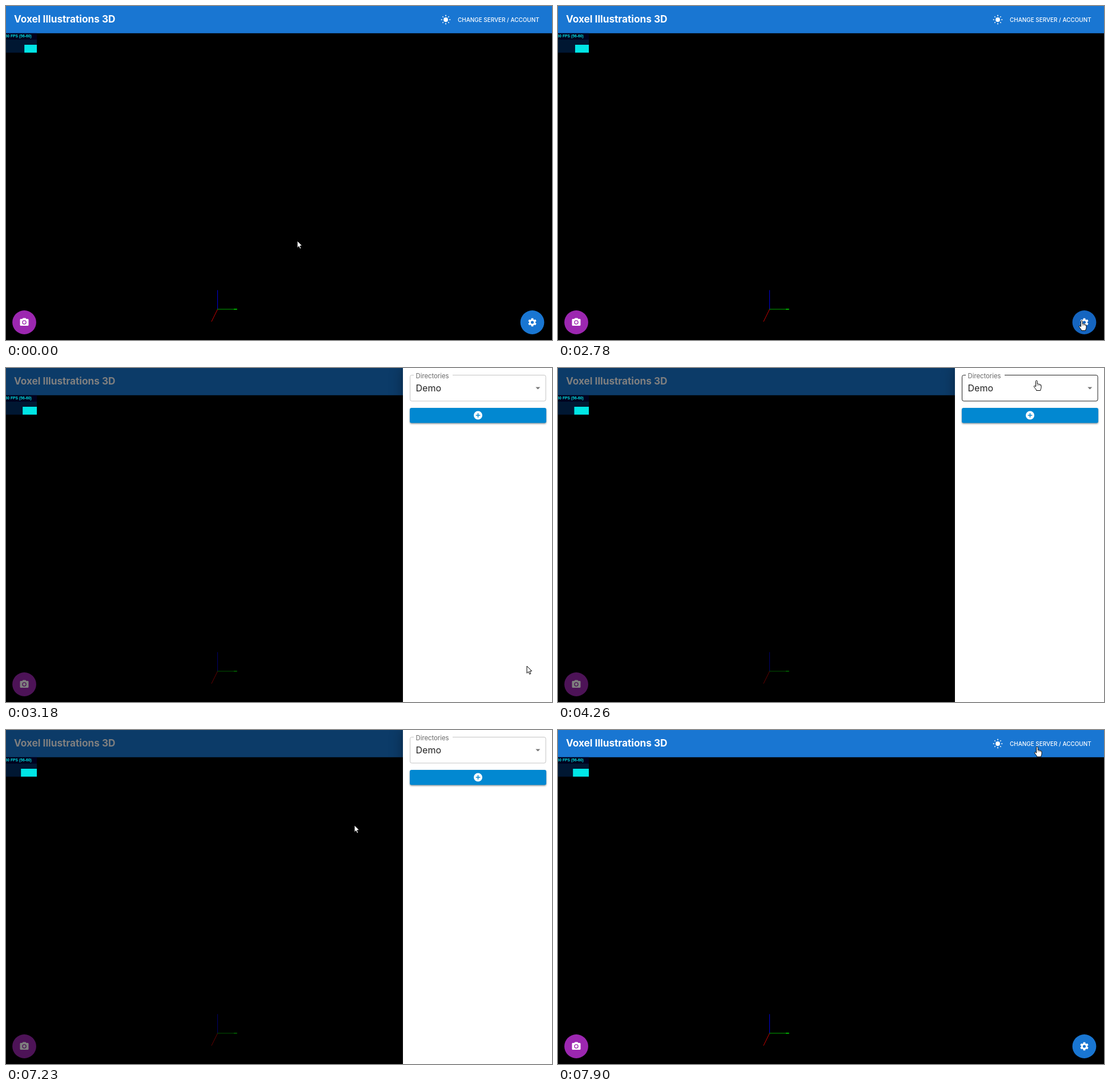
These frames come from a looping animation (956 px wide and 586 px high, 8 s). An HTML page with a canvas:

```html
<!DOCTYPE html>
<html lang="en">
<head>
<meta charset="utf-8">
<title>Voxel Illustrations 3D</title>
<style>
html, body { margin: 0; width: 100%; height: 100%; overflow: hidden; background: #000; }
canvas { display: block; width: 956px; height: 586px; }
</style>
</head>
<body>
<canvas id="stage" width="956" height="586"></canvas>
<script>
const ctx = document.getElementById('stage').getContext('2d');
const W = 956, H = 586, LOOP = 8000, DRAWER = 261, BAR = 47.8;
const BLUE = '#1976d2';
const FONT = 'Inter, "Open Sans", sans-serif';
const EVENT = { open: 2844, focus: 4340, menuOpen: 4340, menuClose: 5544, blur: 7150, close: 7290 };

// The screen refreshes at uneven intervals; delays in hundredths of a second.
const delays = [12, 15, 12, 12, 12, 15, 12, 12, 15, 12, 15, 12, 15, 12, 15, 15, 12, 12, 15, 27, 12,
  12, 15, 15, 12, 15, 12, 15, 27, 12, 15, 12, 15, 15, 40, 40, 15, 12, 15, 12, 40,
  12, 15, 12, 15, 12, 15, 12, 12, 15, 13, 10];

// Pointer waypoints: time, x, y.
const pointerPath = [
  [0, 510, 412], [540, 484, 430], [1020, 490, 445], [1440, 575, 449], [1830, 746, 465],
  [2130, 855, 497], [2370, 915, 548], [2520, 917, 552], [2910, 917, 552], [3180, 912, 523],
  [3600, 862, 170], [3870, 840, 24], [4140, 838, 22], [4410, 838, 22], [4830, 816, 85],
  [5630, 816, 85], [6170, 770, 152], [6570, 768, 153], [7100, 612, 166], [7230, 610, 167],
  [7500, 728, 112], [7770, 815, 50], [7900, 839, 29.5]
];

const clamp = v => Math.min(1, Math.max(0, v));

function bezier(x1, y1, x2, y2) {
  const at = (u, a, b) => 3 * (1 - u) * (1 - u) * u * a + 3 * (1 - u) * u * u * b + u * u * u;
  return value => {
    const x = clamp(value);
    if (x === 0 || x === 1) return x;
    let lo = 0, hi = 1;
    for (let i = 0; i < 24; i++) {
      const mid = (lo + hi) / 2;
      if (at(mid, x1, x2) < x) lo = mid; else hi = mid;
    }
    return at(lo, y1, y2);
  };
}
const easeOut = bezier(0, 0, 0.2, 1);
const easeInOut = bezier(0.4, 0, 0.2, 1);
const easeSharp = bezier(0.4, 0, 0.6, 1);

function refreshTime(t) {
  let time = 0;
  for (const d of delays) {
    if (time + d * 10 > t) break;
    time += d * 10;
  }
  return time;
}

function pointerAt(t) {
  const i = pointerPath.findIndex(p => p[0] > t);
  if (i < 0) return pointerPath[pointerPath.length - 1].slice(1);
  const a = pointerPath[i - 1], b = pointerPath[i];
  const k = (t - a[0]) / (b[0] - a[0]);
  return [a[1] + (b[1] - a[1]) * k, a[2] + (b[2] - a[2]) * k];
}

function rect(x, y, w, h, color) {
  ctx.fillStyle = color;
  ctx.fillRect(x, y, w, h);
}

function disc(x, y, r, color) {
  ctx.fillStyle = color;
  ctx.beginPath();
  ctx.arc(x, y, r, 0, Math.PI * 2);
  ctx.fill();
}

function roundBox(x, y, w, h, r, color) {
  ctx.fillStyle = color;
  ctx.beginPath();
  ctx.roundRect(x, y, w, h, r);
  ctx.fill();
}

function line(x1, y1, x2, y2, color, width = 1) {
  ctx.strokeStyle = color;
  ctx.lineWidth = width;
  ctx.beginPath();
  ctx.moveTo(x1, y1);
  ctx.lineTo(x2, y2);
  ctx.stroke();
}

function label(str, x, y, size, color, weight = 400, family = FONT) {
  ctx.font = `${weight} ${size}px ${family}`;
  ctx.fillStyle = color;
  ctx.fillText(str, x, y);
}

function shadow(color, blur, dx = 0, dy = 0) {
  ctx.shadowColor = color;
  ctx.shadowBlur = blur;
  ctx.shadowOffsetX = dx;
  ctx.shadowOffsetY = dy;
}

function layer(draw) {
  ctx.save();
  draw();
  ctx.restore();
}

function sunIcon(x, y) {
  disc(x, y, 3.9, '#fff');
  layer(() => {
    ctx.translate(x, y);
    ctx.lineCap = 'round';
    for (let i = 0; i < 8; i++) {
      line(0, -6.6, 0, i % 2 ? -7.4 : -7.7, '#fff', 1.5);
      ctx.rotate(Math.PI / 4);
    }
  });
}

const cameraBody = new Path2D('M9 2L7.2 4H4c-1.1 0-2 .9-2 2v12c0 1.1.9 2 2 2h16c1.1 0 2-.9 2-2V6c0-1.1-.9-2-2-2h-3.2L15 2zM17 12a5 5 0 1 0-10 0a5 5 0 1 0 10 0z');

function cameraIcon(x, y) {
  layer(() => {
    ctx.translate(x - 9, y - 9);
    ctx.scale(0.75, 0.75);
    ctx.fillStyle = '#fff';
    ctx.fill(cameraBody, 'evenodd');
    disc(12, 12, 3.2, '#fff');
  });
}

function gearIcon(x, y, hole) {
  layer(() => {
    ctx.translate(x, y);
    disc(0, 0, 5.5, '#fff');
    for (let i = 0; i < 6; i++) {
      roundBox(-1.8, -7.3, 3.6, 4, 0.5, '#fff');
      ctx.rotate(Math.PI / 3);
    }
    disc(0, 0, 2.6, hole);
  });
}

function drawScene(fabHover) {
  rect(0, 0, W, H, '#000');
  line(370.5, 498.5, 370.5, 532, '#0000d8');
  line(370.5, 532, 359.8, 553.8, '#c80000');
  line(370, 532, 404.5, 532, '#00a800', 1.2);
  line(399, 532, 404.5, 532, '#00c000', 1.6);

  rect(0, 0, W, BAR, BLUE);
  label('Voxel Illustrations 3D', 14, 29, 17.2, '#fff', 700);
  sunIcon(770, 24);
  label('CHANGE SERVER / ACCOUNT', 791, 27.7, 9.95, '#fff', 500);

  disc(32, 555, 20.9, '#9c27b0');
  cameraIcon(32, 555);
  const fab = fabHover ? '#1565c0' : BLUE;
  disc(921.5, 555, 20.9, fab);
  gearIcon(921.5, 555, fab);
}

function drawMeter(t) {
  const left = 32.2 - 0.75 * Math.floor(t / 1000 + 0.85);
  const right = 54, bottom = 81.8;
  rect(0, BAR, right, bottom - BAR, '#00001f');
  rect(0, 59, right, bottom - 59, '#001732');
  rect(left, 68, right - left, bottom - 68, '#00e6e6');
  label('60 FPS (56-60)', -1.5, 54.8, 6.75, '#00e6e6', 700, '"Liberation Sans", Arial, sans-serif');
}

function drawSelect(focused, hovered, menuOpen) {
  const width = focused ? 1.6 : 1;
  const inset = width / 2;
  const x = 707 + inset, y = 12 + inset, right = 945.6 - inset, bottom = 58.5 - inset, r = 3;
  ctx.strokeStyle = focused ? BLUE : hovered ? '#212121' : '#c4c4c4';
  ctx.lineWidth = width;
  ctx.beginPath();
  ctx.moveTo(714, y);
  ctx.arcTo(x, y, x, bottom, r);
  ctx.arcTo(x, bottom, right, bottom, r);
  ctx.arcTo(right, bottom, right, y, r);
  ctx.arcTo(right, y, x, y, r);
  ctx.lineTo(782, y);
  ctx.stroke();
  label('Directories', 717.5, 17.5, 11.3, focused ? BLUE : 'rgba(0,0,0,.6)');
  label('Demo', 717.5, 41, 16, 'rgba(0,0,0,.87)');

  const dir = menuOpen ? -1 : 1;
  ctx.fillStyle = 'rgba(0,0,0,.54)';
  ctx.beginPath();
  ctx.moveTo(927.3, 35.5 - 2 * dir);
  ctx.lineTo(935.3, 35.5 - 2 * dir);
  ctx.lineTo(931.3, 35.5 + 2 * dir);
  ctx.fill();
}

function drawAddButton() {
  const color = '#0288d1';
  layer(() => {
    shadow('rgba(0,0,0,.4)', 3, 0, 1.5);
    roundBox(707, 70, 239, 26.5, 3, color);
  });
  disc(826.5, 83, 7.5, '#fff');
  line(822.7, 83, 830.3, 83, color, 1.5);
  line(826.5, 79.2, 826.5, 86.8, color, 1.5);
}

function drawMenu(t) {
  if (t < EVENT.menuOpen || t > EVENT.menuClose + 208) return;
  const closing = t >= EVENT.menuClose;
  let opacity, grow;
  if (closing) {
    const age = t - EVENT.menuClose;
    opacity = 1 - easeInOut(age / 208);
    grow = 1 - easeInOut((age - 69) / 139);
  } else {
    const age = t - EVENT.menuOpen;
    opacity = easeInOut(age / 208);
    grow = easeInOut(age / 139);
  }
  const scale = 0.75 + 0.25 * grow;
  layer(() => {
    ctx.globalAlpha = opacity;
    ctx.translate(826, 81);
    ctx.scale(scale, scale * scale);
    ctx.translate(-826, -81);
    layer(() => {
      shadow('rgba(0,0,0,.35)', 8, 0, 3);
      roundBox(707, 58.5, 238.5, 45.5, 3, '#fff');
    });
    rect(707, 64.5, 238.5, 33, 'rgba(25,118,210,.12)');
    if (closing) layer(() => {
      ctx.beginPath();
      ctx.rect(707, 64.5, 238.5, 33);
      ctx.clip();
      const age = t - EVENT.menuClose;
      disc(817.5, 85, 49 + Math.max(0, age - 86) * 0.4, 'rgba(0,0,0,.26)');
    });
    label('Demo', 719.5, 86.7, 16, 'rgba(0,0,0,.87)');
  });
}

const arrowShape = new Path2D('M0 0V12.4L2.8 9.8L4.7 14.2L6.8 13.3L4.9 9L8.7 8.7Z');
const handShape = new Path2D('M-1.5 1.3C-1.5-.5 1.2-.5 1.2 1.3V6.2C1.8 5.4 3.6 5.5 3.8 6.7C4.6 6 6 6.3 6.2 7.5C7.1 7 8 7.5 8 8.8V12.2C8 14.5 6.7 15.3 6.7 17.5H-.4C-.5 15.5-2.4 14.1-4.2 11.4C-5.5 9.2-3.5 8.2-1.5 10.8Z');

function drawPointer(x, y, hand) {
  layer(() => {
    ctx.translate(x, y);
    const shape = hand ? handShape : arrowShape;
    ctx.fillStyle = '#fff';
    ctx.strokeStyle = '#000';
    ctx.lineWidth = 1;
    ctx.lineJoin = 'round';
    ctx.fill(shape);
    ctx.stroke(shape);
    if (hand) for (const fx of [1.2, 3.8, 6.2]) line(fx, 7, fx, 9.2, '#000', 0.6);
  });
}

function draw(t) {
  const leaving = easeSharp((t - EVENT.close) / 195);
  const slide = easeOut((t - EVENT.open) / 225) * (1 - leaving);
  const dim = 0.5 * easeInOut((t - EVENT.open) / 225) * (1 - easeInOut((t - EVENT.close) / 195));
  const [x, y] = pointerAt(t);
  const open = slide > 0;
  const focused = t >= EVENT.focus && t < EVENT.blur;
  const onFab = !open && Math.hypot(x - 921.5, y - 555) < 21;
  const onForm = open && x > 707 && y > 12 && y < 97;
  const onLink = !open && x > 783 && y > 10 && y < 38;

  drawScene(onFab);
  rect(0, 0, W, H, `rgba(0,0,0,${dim})`);
  drawMeter(t);
  if (open) layer(() => {
    ctx.translate(DRAWER * (1 - slide), 0);
    layer(() => {
      shadow('rgba(0,0,0,.35)', 22);
      rect(W - DRAWER, 0, DRAWER, H, '#fff');
    });
    drawSelect(focused, onForm && y < 58, t >= EVENT.menuOpen && t < EVENT.menuClose);
    drawAddButton();
    drawMenu(t);
  });
  drawPointer(x, y, onFab || onForm || onLink);
}

const start = performance.now();
function tick() {
  draw(refreshTime((performance.now() - start) % LOOP));
  requestAnimationFrame(tick);
}
tick();
</script>
</body>
</html>
```
